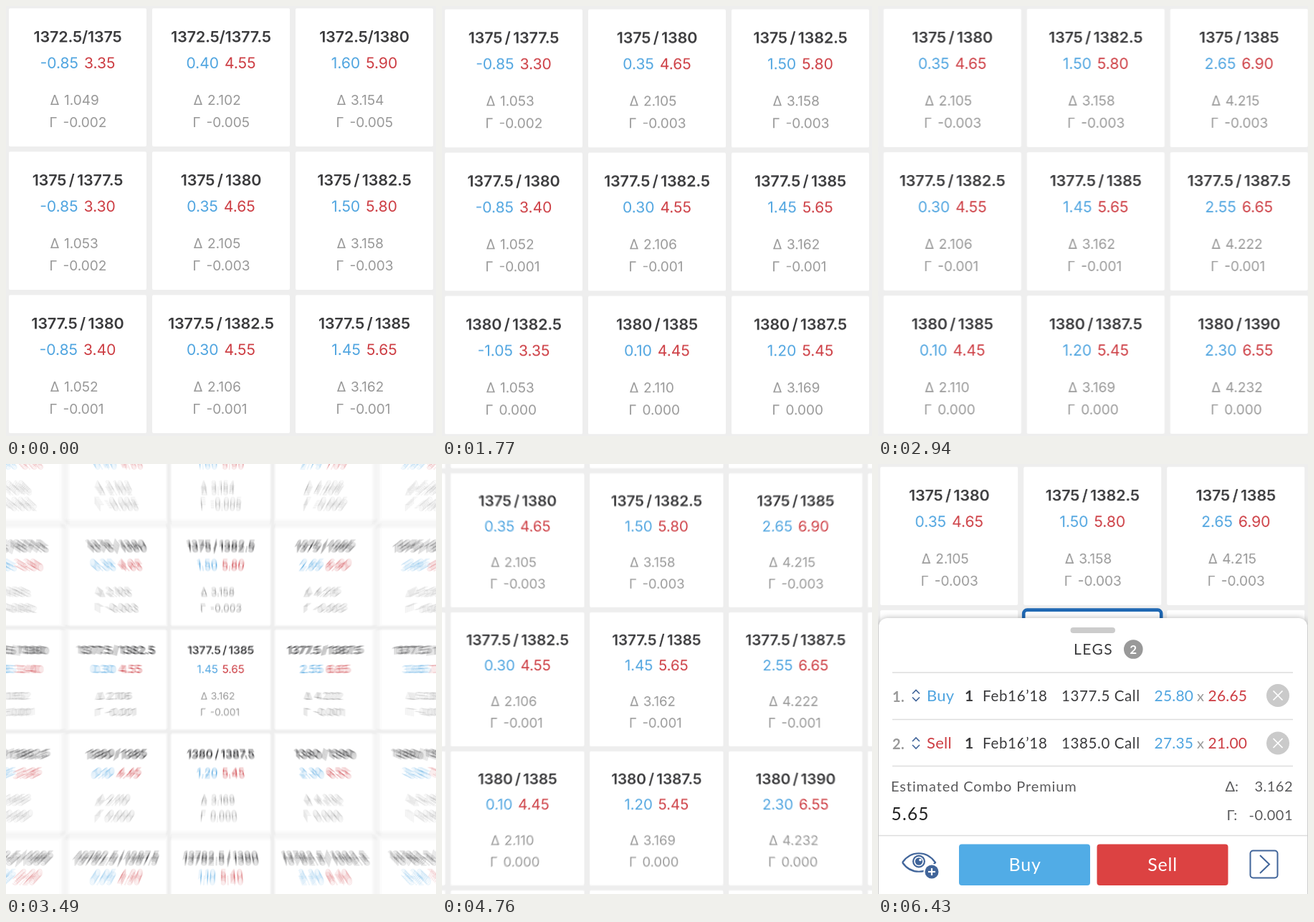
Recreate the animation shown at these times as an HTML page with a canvas. Size 600 by 600 pixels, loop 9.5 s.

```html
<!DOCTYPE html>
<html lang="en">
<head>
<meta charset="utf-8">
<title>Combo grid</title>
<style>
  html, body { margin: 0; width: 100%; height: 100%; overflow: hidden; background: #eee; }
  canvas { display: block; width: 100vw; height: 100vh; }
</style>
</head>
<body>
<canvas id="stage" width="600" height="600"></canvas>
<script>
const LOOP = 9500, STEP = 70, CELL = 200;
const BLUE = '#50a5e0', RED = '#cd3e44', GREY = '#999', DARK = '#3b3b3d', NAVY = '#41659a';
const GRID_FONT = 'Inter, sans-serif', SHEET_FONT = 'Lato, sans-serif';
const ZOOM_CENTER = { x: 300.5, y: 302 };

// Each cell: bid, ask, delta
const rows = [
  { low: '1372.5', sep: '/', first: 1375, gamma: '-0.005', gamma0: '-0.002',
    cells: '-0.85 3.35 1.049|0.40 4.55 2.102|1.60 5.90 3.154|2.75 7.05 4.208|3.85 8.05 5.264' },
  { low: '1375', first: 1377.5, gamma: '-0.003', gamma0: '-0.002',
    cells: '-0.85 3.30 1.053|0.35 4.65 2.105|1.50 5.80 3.158|2.65 6.90 4.215|3.65 8.05 5.275' },
  { low: '1377.5', first: 1380, gamma: '-0.001',
    cells: '-0.85 3.40 1.052|0.30 4.55 2.106|1.45 5.65 3.162|2.55 6.65 4.222|3.65 7.75 5.284' },
  { low: '1380', first: 1382.5, gamma: '0.000',
    cells: '-1.05 3.35 1.053|0.10 4.45 2.110|1.20 5.45 3.169|2.30 6.55 4.232|3.35 7.55 5.297' },
  { low: '13782.5', first: 1385, gamma: '0.000',
    cells: '-1.05 3.20 1.057|0.05 4.30 2.116|1.10 5.40 3.178|2.20 6.40 4.244|3.20 7.40 5.311' }
];

const ctx = document.getElementById('stage').getContext('2d');
ctx.imageSmoothingQuality = 'high';

function text(c, str, x, y, font, color, align = 'left', spacing = 0) {
  c.font = font;
  c.fillStyle = color;
  c.textAlign = align;
  c.letterSpacing = spacing + 'px';
  c.fillText(str, x, y);
}

function box(c, x, y, w, h, r, fill) {
  c.beginPath();
  c.roundRect(x, y, w, h, r);
  if (fill) { c.fillStyle = fill; c.fill(); } else c.stroke();
}

function disc(x, y, r, fill) {
  ctx.beginPath();
  ctx.arc(x, y, r, 0, 2 * Math.PI);
  ctx.fillStyle = fill;
  ctx.fill();
}

function line(color, width, ...points) {
  ctx.beginPath();
  points.forEach(([x, y]) => ctx.lineTo(x, y));
  ctx.strokeStyle = color;
  ctx.lineWidth = width;
  ctx.stroke();
}

function drawCell(c, row, col, data) {
  const [bid, ask, delta] = data.split(' ');
  box(c, 4, 3.3, 192, 192.7, 2, '#fff');
  const title = row.low + (row.sep || '\u2009/\u2009') + (row.first + col * 2.5);
  text(c, title, 100, 50.5, '600 21.5px ' + GRID_FONT, DARK, 'center', -0.15);

  const font = '400 21px ' + GRID_FONT, gap = 8;
  c.font = font;
  c.letterSpacing = '0px';
  const bidWidth = c.measureText(bid).width;
  const left = 100 - (bidWidth + gap + c.measureText(ask).width) / 2;
  text(c, bid, left, 87, font, BLUE);
  text(c, ask, left + bidWidth + gap, 87, font, RED);

  const small = '400 19px ' + GRID_FONT;
  text(c, 'Δ', 61.5, 138, small, GREY);
  text(c, delta, 81, 138, small, GREY);
  text(c, 'Γ', 60.5, 169, small, GREY);
  text(c, col === 0 && row.gamma0 || row.gamma, 79.5, 169, small, GREY);
}

function renderGrid() {
  const canvas = document.createElement('canvas');
  canvas.width = canvas.height = 5 * CELL * 2;
  const c = canvas.getContext('2d');
  c.scale(2, 2);
  c.fillStyle = '#eee';
  c.fillRect(0, 0, 5 * CELL, 5 * CELL);
  rows.forEach((row, r) => row.cells.split('|').forEach((data, col) => {
    c.save();
    c.translate(col * CELL, r * CELL);
    drawCell(c, row, col, data);
    c.restore();
  }));
  return canvas;
}
const grid = renderGrid();

const clamp = v => Math.min(1, Math.max(0, v));

// Cubic bezier easing with control points (a, 0) and (b, 1)
function bezier(a, b) {
  return x => {
    let lo = 0, hi = 1;
    for (let i = 0; i < 24; i++) {
      const s = (lo + hi) / 2, q = 1 - s;
      if (3 * a * s * q * q + 3 * b * s * s * q + s * s * s < x) lo = s; else hi = s;
    }
    return lo * lo * (3 - 2 * lo);
  };
}
const scrollEase = bezier(0.2, 0.11), zoomEase = bezier(0.3, 0.11);

// Motion advances in 70 ms steps; shift is a fraction of a step
function progress(t, start, steps, ease, shift = 0) {
  if (t < start) return 0;
  const k = Math.floor((t - start) / STEP) + 1;
  return k >= steps ? 1 : ease(clamp((k + shift) / steps));
}

function camera(t, shift) {
  return {
    y: 199.2 * progress(t, 1000, 13, scrollEase, shift),
    x: 200.7 * progress(t, 2240, 14, scrollEase, shift),
    scale: 1 - 0.4 * (progress(t, 3350, 8, zoomEase, shift) - progress(t, 4340, 11, zoomEase, shift))
  };
}

function drawGrid(t) {
  const a = camera(t, -0.2), b = camera(t, 0.2);
  const moving = a.x !== b.x || a.y !== b.y || a.scale !== b.scale;
  const samples = moving ? 8 : 1;
  const { x, y } = ZOOM_CENTER;
  for (let i = 0; i < samples; i++) {
    const cam = camera(t, moving ? -0.2 + 0.4 * i / (samples - 1) : 0);
    ctx.save();
    ctx.globalAlpha = 1 / (i + 1);
    ctx.translate(x, y);
    ctx.scale(cam.scale, cam.scale);
    ctx.drawImage(grid, -x - cam.x, -y - cam.y, 5 * CELL, 5 * CELL);
    ctx.restore();
  }
}

function drawTap(t) {
  const linear = v => v;
  const select = progress(t, 5240, 6, linear);
  if (!select) return;
  ctx.save();
  ctx.globalAlpha = select;
  ctx.strokeStyle = '#1f68b3';
  ctx.lineWidth = 4.6;
  box(ctx, 203.2, 203.6, 192, 191.6, 5);

  const press = progress(t, 5240, 4, scrollEase);
  const release = progress(t, 5590, 6, linear);
  ctx.globalAlpha = 0.48 * press * (1 - release);
  disc(296.5, 298, 58 * press + 153 * release, '#52aaf0');
  ctx.restore();
}

function drawLeg(y, number, side, color, strike, bid, ask) {
  const base = y + 7.5, body = '400 20.5px ' + SHEET_FONT, price = '400 21px ' + SHEET_FONT;
  text(ctx, number, 20, base + 1, '700 20px ' + SHEET_FONT, GREY, 'left', 0.5);
  line(NAVY, 1.6, [48, y - 2.5], [53, y - 7.5], [58, y - 2.5]);
  line(NAVY, 1.6, [48, y + 2.5], [53, y + 7.5], [58, y + 2.5]);
  text(ctx, side, 68, base, '400 22px ' + SHEET_FONT, color, 'left', 0.3);
  text(ctx, '1', 121, base, '700 21px ' + SHEET_FONT, DARK);
  text(ctx, 'Feb16’18', 146, base, body, DARK, 'left', 0.7);
  text(ctx, strike + ' Call', 256, base, body, DARK, 'left', 0.6);
  text(ctx, bid, 385.5, base, price, BLUE, 'left', 0.2);
  text(ctx, 'x', 445, base, '400 20px ' + SHEET_FONT, GREY);
  text(ctx, ask, 460.5, base, price, RED, 'left', 0.2);
  disc(558, y, 16, '#cacaca');
  line('#fff', 1.7, [551.5, y - 6.5], [564.5, y + 6.5]);
  line('#fff', 1.7, [564.5, y - 6.5], [551.5, y + 6.5]);
}

function drawEye() {
  ctx.strokeStyle = NAVY;
  ctx.lineWidth = 2.2;
  ctx.beginPath();
  ctx.moveTo(34, 556);
  ctx.bezierCurveTo(46, 539, 68, 539, 80, 556);
  ctx.bezierCurveTo(68, 573, 46, 573, 34, 556);
  ctx.stroke();
  disc(57, 554.5, 9, NAVY);
  disc(57, 554.5, 6.8, '#fff');
  disc(57, 554.5, 5.2, NAVY);
  disc(59, 552.5, 1.8, '#fff');
  disc(75, 569, 11.5, '#fff');
  disc(75, 569, 9.5, NAVY);
  line('#fff', 2.2, [70, 569], [80, 569]);
  line('#fff', 2.2, [75, 564], [75, 574]);
}

function drawSheet(t) {
  const p = progress(t, 5660, 12, scrollEase);
  if (!p) return;
  ctx.save();
  ctx.translate(0, 390 * (1 - p));
  ctx.save();
  ctx.shadowColor = 'rgba(0,0,0,.3)';
  ctx.shadowBlur = 8;
  box(ctx, 1, 215, 598, 400, 12, '#fff');
  ctx.restore();

  box(ctx, 268.5, 228, 62.5, 8, 4, '#ccc');
  text(ctx, 'LEGS', 273, 266, '400 21px ' + SHEET_FONT, DARK, 'left', 1.4);
  disc(356.3, 258.5, 13.3, GREY);
  text(ctx, '2', 356.3, 264.5, '700 17px ' + SHEET_FONT, '#fff', 'center');
  [291, 356.5, 421.5].forEach(y => line('#ddd', 1.3, [20, y], [579, y]));
  line('#ddd', 1.3, [1, 518.5], [599, 518.5]);

  drawLeg(323, '1.', 'Buy', BLUE, '1377.5', '25.80', '26.65');
  drawLeg(389.5, '2.', 'Sell', RED, '1385.0', '27.35', '21.00');

  const label = '400 20px ' + SHEET_FONT, soft = '#5a5a5c';
  text(ctx, 'Estimated Combo Premium', 18, 457, label, soft, 'left', 0.9);
  text(ctx, '5.65', 18.5, 497, '400 24.5px ' + SHEET_FONT, '#222', 'left', 1.2);
  text(ctx, 'Δ:', 484.5, 457, label, soft);
  text(ctx, '3.162', 579, 457, label, soft, 'right', 0.5);
  text(ctx, 'Γ:', 486.5, 497, label, soft);
  text(ctx, '-0.001', 579, 497, label, soft, 'right', 0.5);

  box(ctx, 113, 530.5, 183, 57.5, 4, '#51ace6');
  box(ctx, 305.5, 530.5, 183, 57.5, 4, '#dc4242');
  text(ctx, 'Buy', 205, 567.5, '400 25px ' + SHEET_FONT, '#fff', 'center', 0.8);
  text(ctx, 'Sell', 397, 567.5, '400 25px ' + SHEET_FONT, '#fff', 'center', 0.8);

  drawEye();
  ctx.strokeStyle = NAVY;
  ctx.lineWidth = 2;
  box(ctx, 519.5, 539.5, 38, 38, 4);
  line(NAVY, 2, [533, 546], [546, 558.5], [533, 571]);
  ctx.restore();
}

const began = performance.now();
function frame() {
  const t = (performance.now() - began) % LOOP;
  ctx.fillStyle = '#eee';
  ctx.fillRect(0, 0, 600, 600);
  drawGrid(t);
  drawTap(t);
  drawSheet(t);
  requestAnimationFrame(frame);
}
frame();
</script>
</body>
</html>
```
